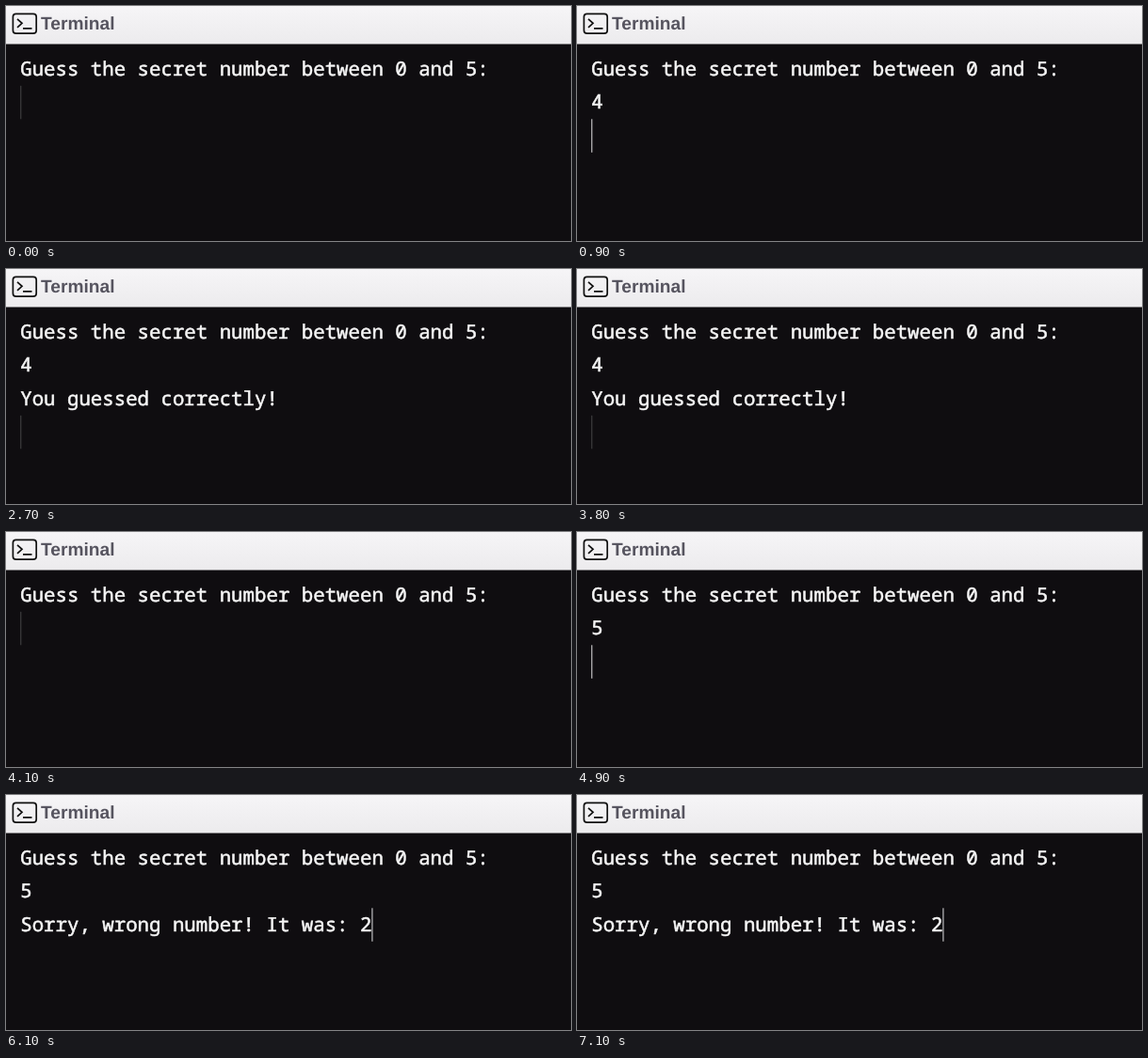
An HTML page for the animation above (7.6 s loop, 600 by 250 pixels).

```html
<!DOCTYPE html>
<html lang="en">
<head>
<meta charset="utf-8">
<title>Terminal</title>
<style>
  html, body { margin: 0; width: 100%; height: 100%; overflow: hidden; background: #0f0d10; }
  svg { display: block; }
  text { text-rendering: geometricPrecision; }
  .title { font: bold 19.2px "Liberation Sans", Arial, sans-serif; fill: #56545f; }
  .line { font: 20.74px "Noto Sans Mono", monospace; fill: #f6f6f6; stroke: #f6f6f6; stroke-width: .55; }
  .icon { fill: none; stroke: #111; stroke-width: 1.7; }
</style>
</head>
<body>
<svg width="600" height="250" viewBox="0 0 600 250">
  <defs>
    <linearGradient id="bar" x2="0" y2="1">
      <stop stop-color="#f6f5f7"/>
      <stop offset="1" stop-color="#ecebed"/>
    </linearGradient>
  </defs>
  <rect width="600" height="250" fill="#0f0d10"/>
  <rect width="600" height="40.5" fill="url(#bar)"/>
  <g class="icon">
    <rect x="7.4" y="8.4" width="24.8" height="20.8" rx="3.2"/>
    <path d="M12 13.8L17 18.3L12 22.8M18 23.8H27.5"/>
  </g>
  <text class="title" x="37" y="25">Terminal</text>
  <text class="line" x="15.2"></text>
  <text class="line" x="15.2"></text>
  <text class="line" x="15.2"></text>
  <rect id="cursor" width="1.4" height="35.5"/>
</svg>
<script>
const LOOP = 7600, LEFT = 15, ADVANCE = 12.44, ROW = 35.5;
const PROMPT = 'Guess the secret number between 0 and 5:\n';
const ON = '#a6a5a7', FADING = '#656466', OFF = '#363537';

// [start in ms, screen contents]; the cursor sits after the last character
const screens = [
  [0, PROMPT],
  [500, PROMPT + '4'],
  [900, PROMPT + '4\n'],
  [1000, PROMPT + '4\nYou guessed correctly!\n'],
  [3900, ''],
  [4100, PROMPT],
  [4500, PROMPT + '5'],
  [4900, PROMPT + '5\n'],
  [5000, PROMPT + '5\nSorry, wrong number! It was: 2'],
];

// [start in ms, cursor colour]
const blinks = [
  [0, OFF], [300, ON], [1600, FADING], [1700, OFF], [2100, ON], [2700, OFF],
  [3100, ON], [3700, FADING], [3800, OFF], [3900, ON], [4100, OFF], [4300, ON],
  [5700, OFF], [6100, ON], [6700, OFF], [7100, ON],
];

const lines = document.querySelectorAll('.line');
const cursor = document.getElementById('cursor');
const valueAt = (track, t) => track.findLast(([start]) => start <= t)[1];

lines.forEach((line, i) => line.setAttribute('y', Math.floor(74 + ROW * i)));

function draw(t) {
  const rows = valueAt(screens, t).split('\n');
  lines.forEach((line, i) => { line.textContent = rows[i] || ''; });
  const last = rows.length - 1;
  cursor.setAttribute('x', LEFT + ADVANCE * rows[last].length);
  cursor.setAttribute('y', 49.3 + ROW * last);
  cursor.setAttribute('fill', valueAt(blinks, t));
}

const begin = performance.now();
function tick() {
  draw((performance.now() - begin) % LOOP);
  requestAnimationFrame(tick);
}
tick();
</script>
</body>
</html>
```
